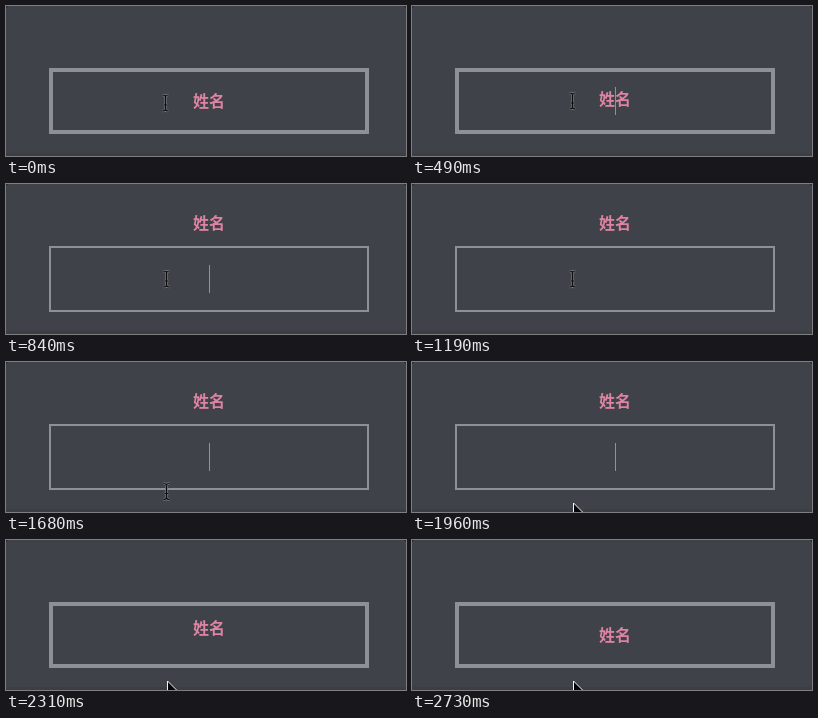
An HTML page that plays this animation: 400x150 px, repeating every 2800 ms.

```html
<!DOCTYPE html>
<html lang="zh">
<head>
<meta charset="utf-8">
<style>
  html, body { margin: 0; width: 100%; height: 100%; overflow: hidden; background: #3f4349; }
  svg { display: block; width: 400px; height: 150px; }
  text { font: bold 16px "Noto Sans CJK SC", "Noto Sans CJK", sans-serif; fill: #de84a3; }
</style>
</head>
<body>
<svg viewBox="0 0 400 150">
  <rect width="400" height="150" fill="#3f4349"/>
  <rect y="147" width="400" height="3" fill="#3b3f44"/>
  <path d="M0 0H2L0 2ZM400 0H398L400 2Z" fill="#24272b"/>
  <rect id="field" fill="none" stroke="#8d9097"/>
  <text id="label" x="203" text-anchor="middle">姓名</text>
  <path id="caret" d="M203.5 81V109" stroke="#8f9298"/>
  <g id="ring" fill="none">
    <circle stroke="#15171a" stroke-width="4"/>
    <circle stroke="#f4f4f4" stroke-width="1.5"/>
  </g>
  <g id="beam" fill="none">
    <path d="M-3-8Q0-8 0-6Q0-8 3-8M0-6V6M-3 8Q0 8 0 6Q0 8 3 8M-2 2H2" stroke="#7c8086" stroke-width="2.4"/>
    <path d="M-3-8Q0-8 0-6Q0-8 3-8M0-6V6M-3 8Q0 8 0 6Q0 8 3 8M-2 2H2" stroke="#0c0d0f" stroke-width="1.2"/>
  </g>
  <path id="arrow" d="M0 0V14L3.3 11L5.5 16L7.7 15L5.6 10H10Z" fill="#050505" stroke="#f4f4f4"/>
</svg>
<script>
const LOOP = 2800, STEP = 70;
const FOCUS = 475, BLUR = 2135, TRANSITION = 300, BLINK = 560;
const el = id => document.getElementById(id);
const clamp = v => Math.min(1, Math.max(0, v));
const set = (node, attrs) => Object.entries(attrs).forEach(([k, v]) => node.setAttribute(k, v));
const show = (node, on) => node.setAttribute('visibility', on ? 'visible' : 'hidden');

const bezier = (a, b, s) => 3 * a * s * (1 - s) ** 2 + 3 * b * s * s * (1 - s) + s ** 3;

// CSS "ease" curve, solved by bisection
function ease(x) {
  let lo = 0, hi = 1;
  for (let i = 0; i < 20; i++) {
    const mid = (lo + hi) / 2;
    if (bezier(0.25, 0.25, mid) < x) lo = mid; else hi = mid;
  }
  return bezier(0.1, 1, lo);
}

function draw(t) {
  const progress = start => ease(clamp((t - start) / TRANSITION));
  const focus = progress(FOCUS) - progress(BLUR);

  const border = Math.round(4 - 2 * focus);
  set(el('field'), {
    x: 43 + border / 2, y: 62 + border / 2,
    width: 320 - border, height: 66 - border, 'stroke-width': border
  });
  set(el('label'), { y: 101 - 56 * focus });

  const focused = t >= FOCUS && t < BLUR;
  show(el('caret'), focused && Math.floor((t - 490) / BLINK) % 2 === 0);

  const settle = clamp(t / 210);
  const leave = clamp((t - 1400) / 560);
  const x = 159.5 + settle;
  const y = 97 - 2 * settle + 46 * (1 - (1 - leave) ** 2);
  const outside = y > 131;
  show(el('beam'), !outside);
  show(el('arrow'), outside);
  set(el('beam'), { transform: `translate(${x} ${y})` });
  set(el('arrow'), { transform: `translate(${x + 1} ${y})` });

  const pressed = t >= 350 && t < 490 || t >= 2100 && t < 2240;
  show(el('ring'), pressed);
  set(el('ring'), { transform: `translate(${x + 0.5} ${y + 1})` });
  for (const circle of el('ring').children) set(circle, { r: t >= 2170 ? 21.5 : 17 });
}

function frame() {
  draw(Math.floor(performance.now() % LOOP / STEP) * STEP);
  requestAnimationFrame(frame);
}
frame();
</script>
</body>
</html>
```
